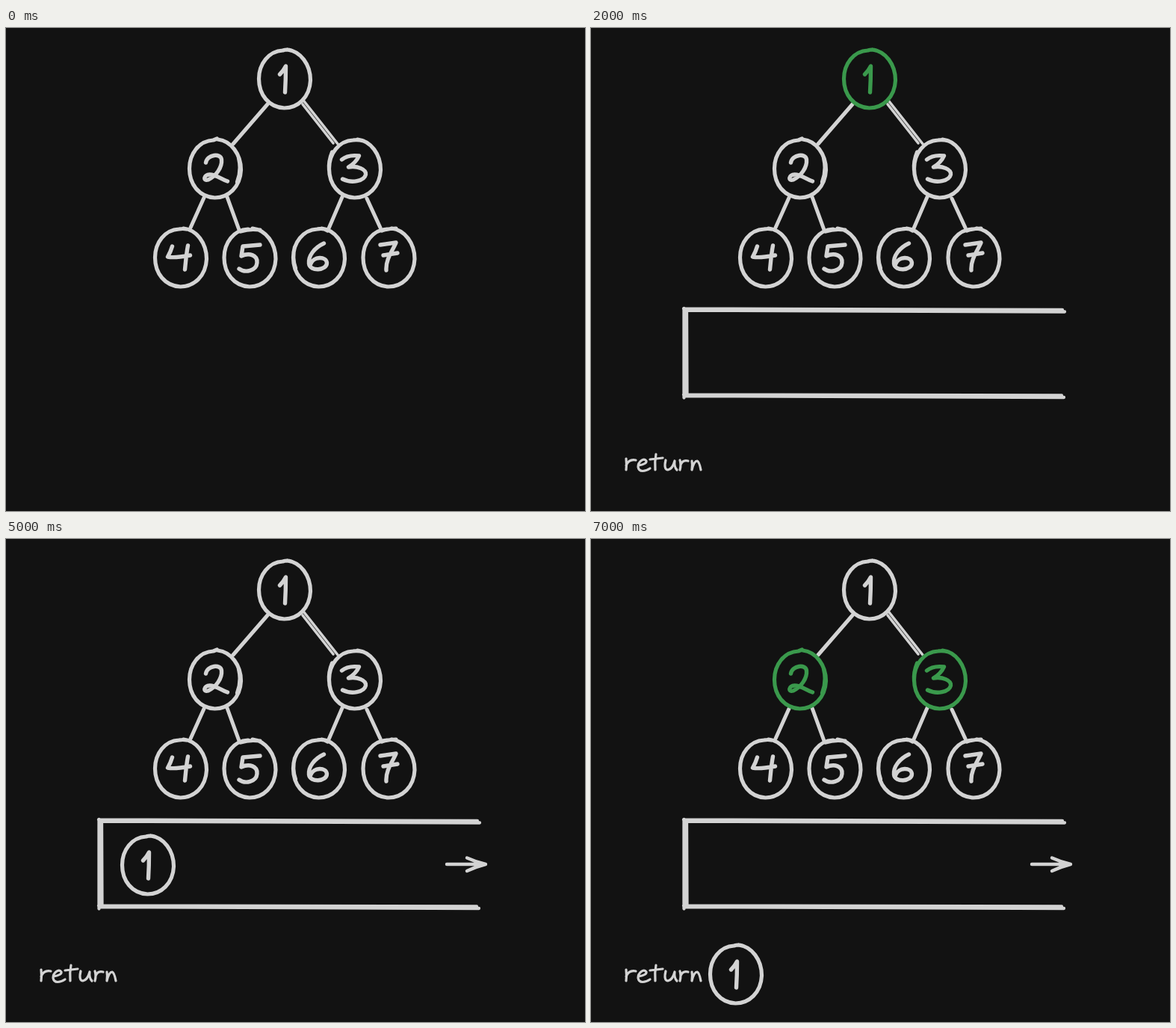
Write an HTML page that moves like this. It is 775 px wide and 646 px high and loops after 8 s.

```html
<!DOCTYPE html>
<html lang="en">
<meta charset="utf-8">
<title>Breadth-first traversal</title>
<style>
  html, body { margin: 0; width: 100%; height: 100%; overflow: hidden; background: #121212; }
  svg { display: block; width: 100%; height: 100%; }
  path { fill: none; stroke: currentColor; stroke-linecap: round; stroke-linejoin: round; }
</style>
<svg id="stage" viewBox="0 0 775 646" color="#d3d3d3"></svg>
<script>
const WHITE = '#d3d3d3', GREEN = '#3a994c', LOOP = 8000;
const stage = document.getElementById('stage');

// Hand-drawn shapes, relative to the centre of a node
const OUTLINE = 'M4-39C22-37 35-19 35 2C34 25 18 39 0 39C-21 38-34 21-34 0C-34-20-21-37-2-38';
const TAILS = {
  1: 'Q4-40 9-38', 2: 'Q3-40 3-40M32-14Q36 2 30 18', 3: 'Q4-39 12-37M-30-22Q-35-10-34 2',
  4: 'Q3-39 8-38', 5: 'M-12-35Q0-39 14-37', 6: 'Q6-40 12-36M-32-14Q-36 0-31 14', 7: 'M-9-36Q0-39 10-39'
};
const DIGITS = {
  1: 'M-6-6Q-1-11 2-17Q2 2 1 18',
  2: 'M-12-8C-10-19 8-21 9-12C10-2 2 10-9 15C-16 17-15 8-7 8C2 8 8 14 17 17',
  3: 'M-17-12C-10-18-2-18 6-17Q2-8-8-2C4-4 16 1 15 8C13 17-4 20-16 14',
  4: 'M-11-15Q-13-8-17-1C-8 1 2-1 13-3M10-16C8-6 7 6 6 16',
  5: 'M14-17L-9-15L-11-2C0-7 11-3 10 7C9 18-6 21-14 15',
  6: 'M7-19C-6-13-14-2-13 8C-12 19 11 18 11 7C10-2-7-2-11 9',
  7: 'M-11-17L10-20C6-10-4 2-3 17M-7-3L12-6'
};

function add(parent, tag, attrs) {
  const el = document.createElementNS('http://www.w3.org/2000/svg', tag);
  for (const key in attrs) el.setAttribute(key, attrs[key]);
  return parent.appendChild(el);
}

const stroke = (d, width, parent = stage) => add(parent, 'path', { d, 'stroke-width': width });

function node(digit, x, y) {
  const group = add(stage, 'g', { transform: `translate(${x} ${y})` });
  stroke(OUTLINE + TAILS[digit], 5.2, group);
  stroke(DIGITS[digit], 5.4, group);
  return group;
}

// Tree
stroke('M399 98L444 155M397 102L438 154', 3.6);
stroke('M350 102L304 155M265 227L247 267M296 226L312 270M450 226L432 268M483 228L501 267', 5);
const root = node(1, 372.5, 68);
const left = node(2, 279.5, 188);
const right = node(3, 466.5, 188);
node(4, 233.5, 307);
node(5, 326, 307);
node(6, 418.5, 307);
node(7, 512, 307);

// Queue and its label
const queue = add(stage, 'g', {});
stroke('M124 375.5L631 377M126 377.5L634 379.5M124 490.5L630 491.5M126 492L633 494'
  + 'M124.5 375L124.5 494.5M128 377L128.5 492', 4.3, queue);
const label = add(queue, 'g', { role: 'img', 'aria-label': 'return' });
stroke('M47 576Q48 584 47 591M47 585Q51 576 60 578'
  + 'M64 585Q75 583 74 579C71 574 63 580 63 587C64 595 73 593 79 589'
  + 'M87 570Q85 580 86 591M79 577Q87 576 96 575'
  + 'M100 578C98 586 99 591 103 591Q109 590 112 579Q111 587 115 591'
  + 'M119 578Q121 584 119 591M120 584Q123 577 130 579'
  + 'M135 579Q136 584 135 591Q138 579 142 579Q145 580 147 591', 3.2, label);

const arrowIn = stroke('M647 436.5L589 436M617 427.5Q602 431 589 436Q603 441 617 446', 4.4);
const arrowOut = stroke('M590 435L642 435M617 426.5Q629 432 642 435Q630 438 617 444', 4.4);
const entering = node(1, 701.5, 439);
const queued = node(1, 189.5, 436);
const leaving = node(1, 692.5, 439);
const returned = node(1, 193.5, 582);

// Half-open range of seconds in which each part is visible or green
const visible = [
  [queue, 1, 8], [entering, 3, 4], [arrowIn, 3, 5], [queued, 4, 6],
  [arrowOut, 5, 8], [leaving, 6, 7], [returned, 7, 8]
];
const highlighted = [[root, 2, 4], [left, 6, 8], [right, 6, 8]];

function draw() {
  const second = performance.now() % LOOP / 1000;
  const during = (from, to) => second >= from && second < to;
  for (const [part, from, to] of visible)
    part.style.display = during(from, to) ? '' : 'none';
  for (const [part, from, to] of highlighted)
    part.style.color = during(from, to) ? GREEN : WHITE;
  requestAnimationFrame(draw);
}
draw();
</script>
</html>
```
